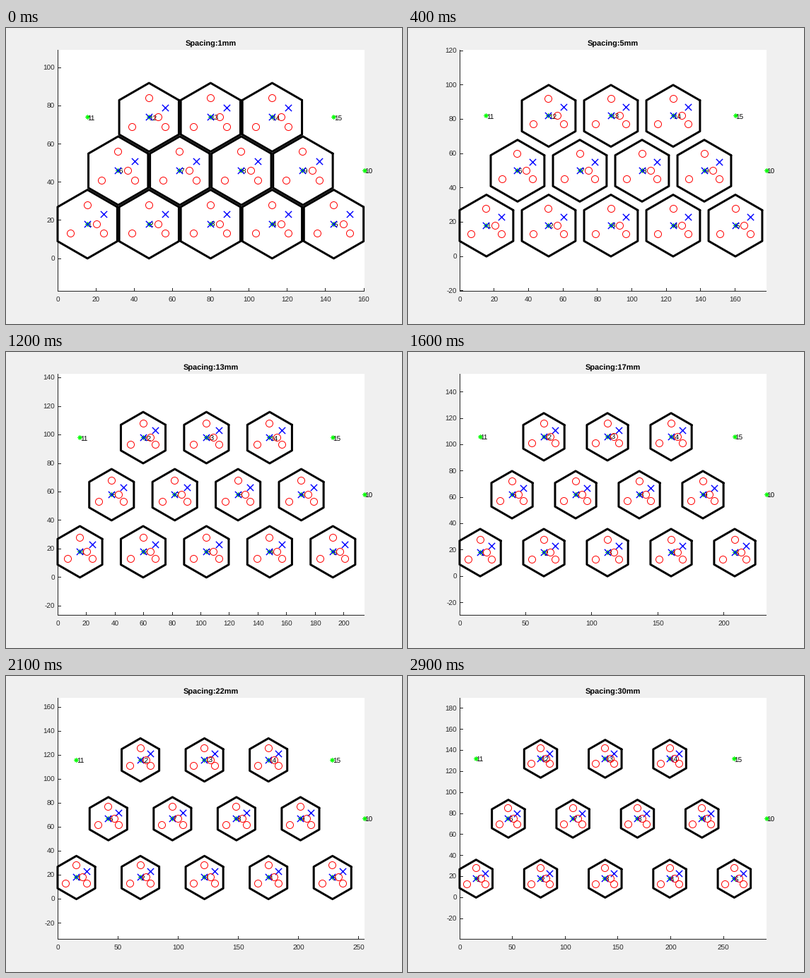
Animation, 560 px wide and 420 px high, one loop 3000 ms. Source, as a matplotlib script:

```python
import numpy as np
import matplotlib.pyplot as plt
from matplotlib.animation import FuncAnimation
from matplotlib.patches import Rectangle

W, H, DPI = 560, 420, 80
PX = 72 / DPI                       # points per pixel
LEFT, RIGHT, TOP, BOTTOM = 73, 507, 31, 374
MID_Y = 202.5
FLOOR = 0.45                        # turns pixel rounding into flooring
INK = "#262626"

R = 18                              # hexagon radius in mm
HALF = R * np.sqrt(3) / 2
EMPTY = {10, 11, 15}                # grid nodes without a hexagon

ANGLES = np.radians(np.arange(30, 391, 60))
HEX_X, HEX_Y = R * np.cos(ANGLES), R * np.sin(ANGLES)
C30 = 10 * np.cos(np.pi / 6)
RINGS = np.array([(0, 10), (5, 0), (-C30, -5), (C30, -5)])
CROSSES = np.array([(0, 0), (C30, 5)])
STAR, CROSS = (8, 2, 0), (4, 2, 45)

plt.rcParams["font.family"] = "Liberation Sans"
plt.rcParams["text.hinting"] = "none"

fig = plt.figure(figsize=(W / DPI, H / DPI), dpi=DPI, facecolor="#f0f0f0")
ax = fig.add_axes([0, 0, 1, 1])


def label(x, y, text, size=10, **kw):
    ax.text(x, y, text, fontsize=size * PX, va="baseline", **kw)


def line(xs, ys, color=INK, width=1, **kw):
    ax.plot(xs, ys, color=color, lw=width * PX, **kw)


def marks(xs, ys, marker, color, size, z):
    ax.plot(np.subtract(xs, FLOOR), np.subtract(ys, FLOOR), ls="none",
            marker=marker, ms=size * PX, mfc="none", mec=color, mew=PX,
            zorder=z)


def ticks(lo, hi, step):
    return range(int(np.ceil(lo / step)) * step, int(hi) + 1, step)


def grid(spacing):
    """Yield the number and centre of each of the 15 nodes, in mm."""
    dx = 2 * HALF + spacing
    for row in range(3):
        for col in range(5):
            yield (5 * row + col + 1,
                   HALF + (col + 0.5 * (row == 1)) * dx,
                   R + row * (1.5 * R + spacing))


def draw_axes(px, py, x_max, y_min, y_max):
    base = BOTTOM - 1
    ax.add_patch(Rectangle((LEFT, TOP), RIGHT - LEFT, BOTTOM - TOP,
                           fc="white", ec="none", zorder=0))
    line([LEFT, LEFT], [TOP, base], zorder=1)
    line([LEFT, RIGHT - 1], [base, base], zorder=1)
    for t in ticks(0, x_max, 20 if x_max < 220 else 50):
        line([px(t) - FLOOR] * 2, [base - 4, base], zorder=1)
        label(px(t), 389, str(t), ha="center", color=INK)
    for t in ticks(y_min, y_max, 20):
        line([LEFT, LEFT + 4], [py(t) - FLOOR] * 2, zorder=1)
        label(68.8, py(t) + 3.8, str(t), ha="right", color=INK)


def draw(i):
    spacing = i + 1
    nodes = list(grid(spacing))
    x_max = max(x for _, x, _ in nodes)
    y_mid = (nodes[-1][2] + R) / 2
    scale = (RIGHT - LEFT) / x_max
    y_half = 171.2 / scale

    def px(x):
        return LEFT + x * scale

    def py(y):
        return MID_Y - (y - y_mid) * scale

    ax.clear()
    ax.set(xlim=(0, W), ylim=(H, 0))
    ax.axis("off")
    draw_axes(px, py, x_max, y_mid - y_half, y_mid + y_half)
    label(290, 26, f"Spacing:{spacing}mm", 11, ha="center", weight="bold")

    for n, x, y in nodes:
        marks([px(x)], [py(y)], STAR, "#00ff00", 6, 3)
        label(px(x) + 0.3, py(y) + 4, str(n), zorder=4)
        if n in EMPTY:
            continue
        line(px(x + HEX_X), py(y + HEX_Y), "black", 3, zorder=2,
             solid_joinstyle="round", solid_capstyle="round")
        marks(px(x + CROSSES[:, 0]), py(y + CROSSES[:, 1]), CROSS, "blue",
              13, 5)
        marks(px(x + RINGS[:, 0]), py(y + RINGS[:, 1]), "o", "red", 10, 6)
    return []


anim = FuncAnimation(fig, draw, frames=30, interval=100, repeat=True)
plt.show()
```
